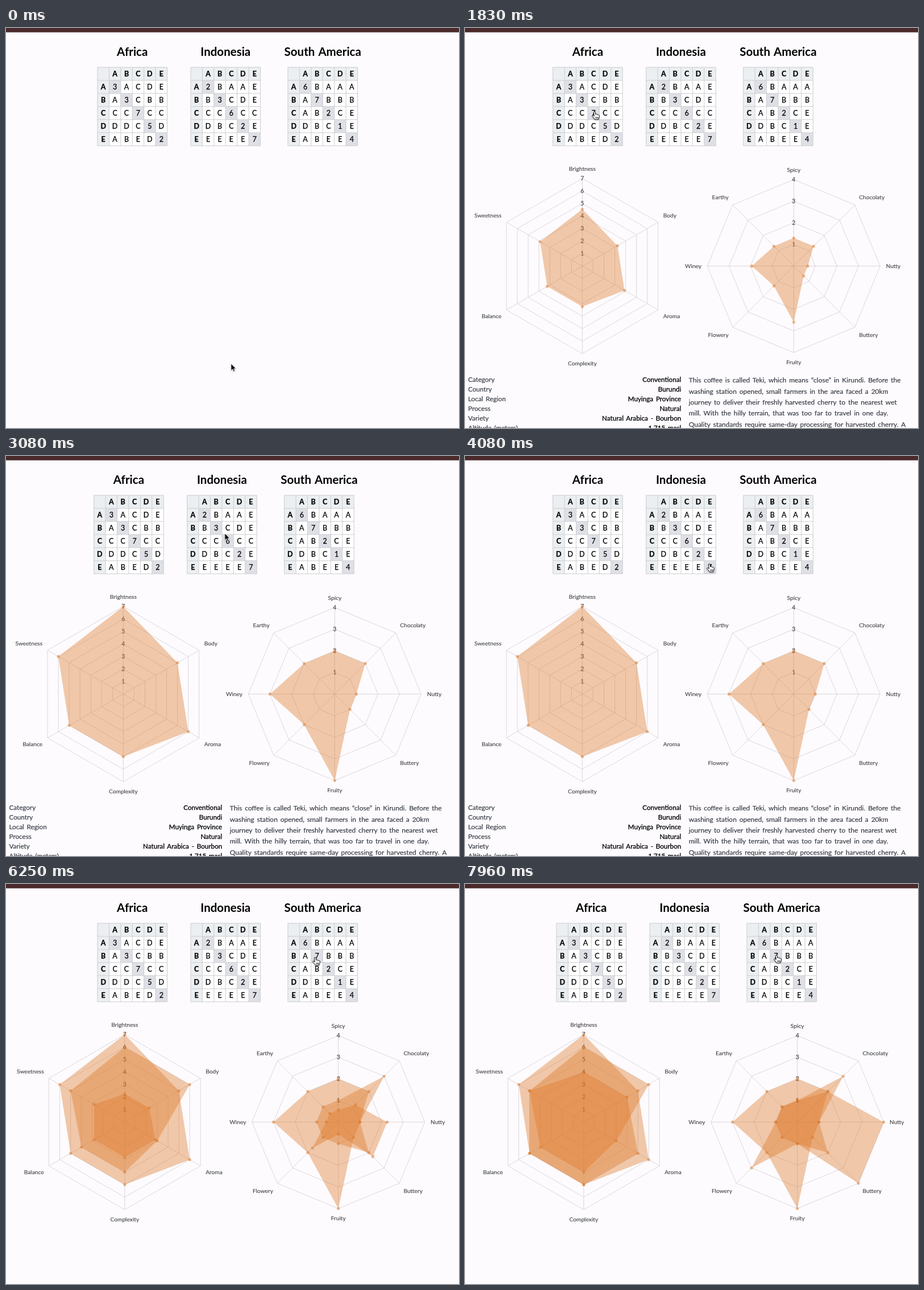
An HTML page that plays this animation: 797 by 703 pixels, repeating every 8000 ms.

```html
<!DOCTYPE html>
<html lang="en">
<head>
<meta charset="utf-8">
<title>Coffee flavour charts</title>
<style>
  html, body { margin: 0; width: 100%; height: 100%; overflow: hidden; background: #fdfbfe; }
  svg { display: block; width: 797px; height: 703px; font-family: Lato, "Open Sans", sans-serif; word-spacing: .11em; }
  .title { font-size: 20.5px; font-weight: 700; text-anchor: middle; }
  .cell { font-size: 12.6px; text-anchor: middle; stroke: #000; stroke-width: .25; }
  .head { font-weight: 700; }
  .label, .tick { font-size: 10.2px; fill: #48484c; stroke: #48484c; stroke-width: .15; }
  .tick { font-size: 10.5px; text-anchor: middle; }
  .grid { fill: none; stroke: #d6d4d8; stroke-width: .9; }
  .area { fill: #dc7828; fill-opacity: .4; }
  .dot { fill: #dc7828; fill-opacity: .5; }
  .key, .story { font-size: 11.7px; fill: #363a44; stroke: #363a44; stroke-width: .18; }
  .value { font-size: 11.7px; text-anchor: end; stroke: #000; stroke-width: .3; }
  .story { font-size: 12px; }
</style>
</head>
<body>
<svg id="stage" viewBox="0 0 797 703"></svg>
<script>
const LOOP = 8000, GROW = 800;
const SHOW = 1500, CLOSE = 4340;   // charts open; detail text closes
const STARTS = [1529, 4366, 5989]; // one per selected coffee
const COL = 20.42, ROW = 23, TOP = 69, SHIFT = 6.3, MIDDLE = 418.4;

const tables = [
  { name: 'Africa', x: 161, rows: ['3ACDE', 'A3CBB', 'CC7CC', 'DDC5D', 'ABED2'] },
  { name: 'Indonesia', x: 325, rows: ['2BAAE', 'B3CDE', 'CC6CC', 'DBC2E', 'EEEE7'] },
  { name: 'South America', x: 496, rows: ['6BAAA', 'A7BBB', 'AB2CE', 'DBC1E', 'ABEE4'] }
];

const charts = [
  {
    wide: 208.9, narrow: 206.4, radius: 154, max: 7,
    axes: ['Brightness', 'Body', 'Aroma', 'Complexity', 'Balance', 'Sweetness'],
    data: [[7, 5, 6, 5, 5, 6], [6, 6, 3, 4, 4, 5], [4, 4, 5, 5, 5, 5]]
  },
  {
    wide: 584.7, narrow: 578.4, radius: 152, max: 4,
    axes: ['Spicy', 'Chocolaty', 'Nutty', 'Buttery', 'Fruity', 'Flowery', 'Winey', 'Earthy'],
    data: [[2, 2, 1, 1, 4, 2, 3, 2], [1, 3, 1, 2, 1, 1, 1, 1], [1, 2, 4, 4, 1, 3, 1, 1]]
  }
];

const facts = [
  ['Category', 'Conventional'], ['Country', 'Burundi'], ['Local Region', 'Muyinga Province'],
  ['Process', 'Natural'], ['Variety', 'Natural Arabica - Bourbon'], ['Altitude (meters)', '1,715 masl']
];
const story = [
  'This coffee is called Teki, which means “close” in Kirundi. Before the',
  'washing station opened, small farmers in the area faced a 20km',
  'journey to deliver their freshly harvested cherry to the nearest wet',
  'mill. With the hilly terrain, that was too far to travel in one day.',
  'Quality standards require same-day processing for harvested cherry. A'
];

// time, x, y of the pointer's hot spot
const path = [
  [80, 396, 590], [250, 263, 353], [460, 263, 353], [500, 236, 316], [540, 219, 342],
  [750, 219, 342], [1290, 228, 147], [2330, 228, 147], [3080, 385, 136], [3380, 385, 136],
  [4050, 430, 190], [4400, 430, 190], [4830, 458, 180], [5040, 460, 178], [5750, 544, 129],
  [6300, 544, 129], [7000, 548, 125]
];

const text = (cls, x, y, s, extra = '') => `<text class="${cls}" x="${x}" y="${y}" ${extra}>${s}</text>`;
const rect = (x, y, w, h, fill) => `<rect x="${x}" y="${y}" width="${w}" height="${h}" fill="${fill}"/>`;

function polar(i, n, r) {
  const a = 2 * Math.PI * i / n;
  return [r * Math.sin(a), -r * Math.cos(a)];
}

const ringPoints = (n, radiusAt) =>
  Array.from({ length: n }, (_, i) => polar(i, n, radiusAt(i)));

const join = points => points.map(p => p.map(v => v.toFixed(2)).join()).join(' ');

function drawTable({ name, x, rows }) {
  const width = COL * 6, height = ROW * 6;
  let out = text('title', x + width / 2, 48.8, name) + rect(x, TOP, width, height, '#fff')
    + rect(x, TOP, width, ROW, '#eceff1') + rect(x, TOP, COL, height, '#eceff1');
  const lines = [];
  for (let i = 0; i <= 6; i++) {
    if (i > 0 && i < 6) out += rect(x + COL * i, TOP + ROW * i, COL, ROW, '#dee0e6');
    lines.push(`M${x} ${TOP + ROW * i}h${width}M${x + COL * i} ${TOP}v${height}`);
  }
  out += `<path d="${lines.join('')}" fill="none" stroke="#cbccd0"/>`;
  [' ABCDE', ...rows.map((r, i) => 'ABCDE'[i] + r)].forEach((row, r) =>
    [...row].forEach((ch, c) => {
      out += text(r && c ? 'cell' : 'cell head', x + COL * (c + .5), TOP + ROW * (r + .5) + 4.5, ch);
    }));
  return out;
}

function drawChart({ axes, radius, max, data }, index) {
  const n = axes.length;
  let out = '';
  for (let k = 1; k <= max; k++)
    out += `<polygon class="grid" points="${join(ringPoints(n, () => radius * k / max))}"/>`;
  axes.forEach((name, i) => {
    const [x, y] = polar(i, n, radius);
    const [lx, ly] = polar(i, n, radius + 10.3);
    const side = v => Math.abs(v) < 1 ? 0 : Math.sign(v);
    const anchor = ['end', 'middle', 'start'][side(lx) + 1];
    out += `<path class="grid" d="M0 0L${x} ${y}"/>`
      + text('label', lx, ly + 6.5 * side(ly) + 3.4, name, `text-anchor="${anchor}"`);
  });
  for (let k = 1; k <= max; k++) out += text('tick', 0, 3.5 - radius * k / max, k);
  data.forEach(values => {
    out += `<g class="layer"><polygon class="area"/>${'<circle class="dot" r="2.6"/>'.repeat(values.length)}</g>`;
  });
  return `<g id="chart${index}">${out}</g>`;
}

const stage = document.getElementById('stage');
stage.innerHTML = rect(0, 0, 797, 703, '#fdfbfe')
  + rect(0, 0, 797, 7.6, '#4b2a2c') + rect(0, 0, 742, 1, '#422527')
  + `<g id="tables">${tables.map(drawTable).join('')}</g>`
  + `<g id="charts">${charts.map(drawChart).join('')}</g>`
  + '<g id="details">'
  + facts.map(([k, v], i) => text('key', 5.5, 622.3 + 17 * i, k) + text('value', 380.3, 622.3 + 17 * i, v)).join('')
  + story.map((s, i) => text('story', 393.7, 623.2 + 19.35 * i, s)).join('')
  + '</g>'
  + `<g id="pointer" style="filter:drop-shadow(0 1px 1px rgba(0,0,0,.3))">
      <path id="arrow" d="M0 0V12L2.8 9.4L4.6 13.4L6.6 12.5L4.9 8.7H8.6Z" fill="#000" stroke="#fff" stroke-width=".8"/>
      <path id="hand" d="M-1.4 1.1C-1.4 -.5 1.2 -.5 1.3 1.1L1.7 4.9C2.4 4 3.8 4.3 4 5.3C4.9 4.5 6.1 5 6.2 6
        C7.2 5.4 8.4 6 8.3 7.3C8.3 9.6 7.6 10.6 7 12V13.8H.4C-.6 11.6 -2.6 10.2 -4 8.3C-4.9 6.9 -3.3 5.9 -2.1 7L-.8 8.2Z
        M2 9.4V12M3.8 9.4V12M5.5 9.4V12" fill="#fff" stroke="#000" stroke-width=".9" stroke-linejoin="round"/>
    </g>`;

const el = id => document.getElementById(id);
const show = (node, on) => node.setAttribute('visibility', on ? 'visible' : 'hidden');
const move = (node, x, y) => node.setAttribute('transform', `translate(${x} ${y})`);
const layers = charts.map((_, i) => [...el('chart' + i).querySelectorAll('.layer')]);

// cubic-bezier(.25, .1, .25, 1)
function ease(x) {
  if (x <= 0) return 0;
  if (x >= 1) return 1;
  const curve = (a, b, u) => 3 * a * u * (1 - u) ** 2 + 3 * b * u * u * (1 - u) + u ** 3;
  let lo = 0, hi = 1;
  for (let i = 0; i < 24; i++) {
    const mid = (lo + hi) / 2;
    if (curve(.25, .25, mid) < x) lo = mid; else hi = mid;
  }
  return curve(.1, 1, lo);
}

function pointerAt(t) {
  const next = path.findIndex(p => p[0] > t);
  if (next === 0) return path[0].slice(1);
  if (next < 0) return path[path.length - 1].slice(1);
  const [t0, x0, y0] = path[next - 1], [t1, x1, y1] = path[next];
  const u = (t - t0) / (t1 - t0), s = u * u * (3 - 2 * u);
  return [x0 + (x1 - x0) * s, y0 + (y1 - y0) * s];
}

// only the numbered diagonal cells are clickable
const overNumber = (x, y, shift) => tables.some(table => {
  const c = Math.floor((x - table.x + shift) / COL), r = Math.floor((y - TOP) / ROW);
  return c === r && c > 0 && c < 6;
});

function growLayer(node, chart, values, scale) {
  const points = ringPoints(values.length, i => chart.radius * values[i] / chart.max * scale);
  const [area, ...dots] = node.children;
  area.setAttribute('points', join(points));
  dots.forEach((dot, i) => {
    dot.setAttribute('cx', points[i][0]);
    dot.setAttribute('cy', points[i][1]);
  });
}

function render(t) {
  const open = t >= SHOW, narrow = open && t < CLOSE;
  const shift = narrow ? SHIFT : 0;
  move(el('tables'), -shift, 0);
  show(el('details'), narrow);
  el('charts').style.display = open ? '' : 'none';
  charts.forEach((chart, c) => {
    move(el('chart' + c), narrow ? chart.narrow : chart.wide, MIDDLE);
    layers[c].forEach((node, i) => {
      const age = t - STARTS[i];
      node.style.display = age > 0 ? '' : 'none';
      if (age > 0) growLayer(node, chart, chart.data[i], ease(age / GROW));
    });
  });
  const [x, y] = pointerAt(t), hand = overNumber(x, y, shift);
  move(el('pointer'), x, y);
  show(el('hand'), hand);
  show(el('arrow'), !hand);
}

const begin = performance.now();
function tick() {
  render((performance.now() - begin) % LOOP);
  requestAnimationFrame(tick);
}
tick();
</script>
</body>
</html>
```
